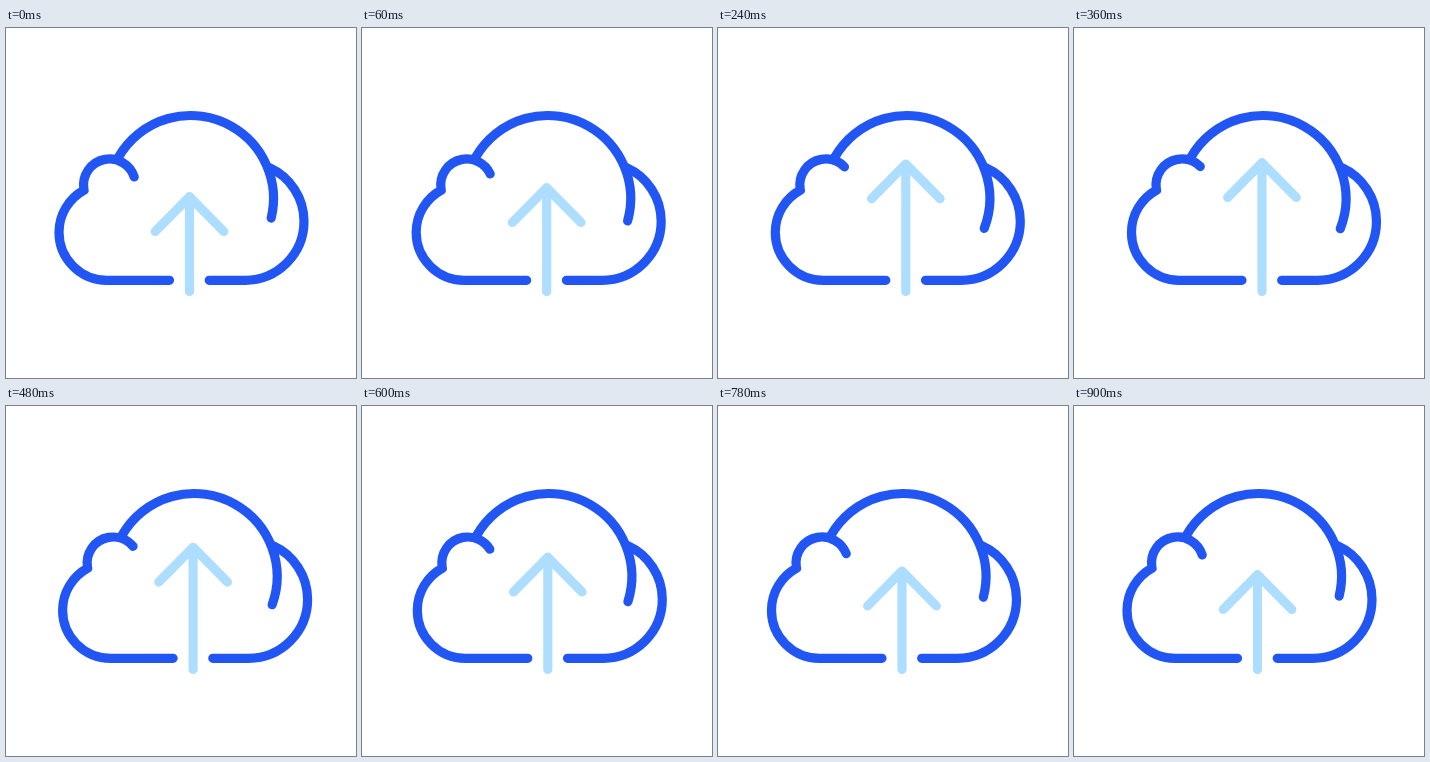
Recreate the animation shown at these times as an HTML page with a canvas. Size 350x350 px, loop 1040 ms.

```html
<!DOCTYPE html>
<html lang="en">
<head>
<meta charset="utf-8">
<title>Cloud upload</title>
<style>
  html, body { margin: 0; height: 100%; overflow: hidden; background: #fff; }
  canvas { display: block; }
</style>
</head>
<body>
<canvas id="stage" width="350" height="350"></canvas>
<script>
const ctx = document.getElementById('stage').getContext('2d');
const LOOP = 1040, STEP = 30, PEAK = 10, LAST = 30;
const rad = deg => deg * Math.PI / 180;

// 0 at rest, 1 when raised: quick rise, slow smooth return
function lift(ms) {
  const n = Math.min(Math.floor(ms / STEP), LAST);
  if (n < PEAK) {
    const p = n / PEAK;
    return p * (1.2 + 0.6 * p - 0.8 * p * p);
  }
  const p = (n - PEAK) / (LAST - PEAK);
  return 1 - p * p * (3 - 2 * p);
}

function stroke(color, build) {
  ctx.strokeStyle = color;
  ctx.beginPath();
  build();
  ctx.stroke();
}

function drawCloud(k) {
  stroke('#2156f5', () => {
    // left side and small bump
    ctx.moveTo(163.5, 252.3);
    ctx.arc(101, 204.3, 48, rad(90), rad(241.5));
    ctx.arc(103.5, 157, 26, rad(170), rad(342 - 28 * k));
    // main dome
    ctx.moveTo(184.5 + 83 * Math.cos(rad(209.5)), 170.5 + 83 * Math.sin(rad(209.5)));
    ctx.arc(184.5, 170.5, 83, rad(209.5), rad(373.6 + 8 * k));
    // right side
    ctx.moveTo(203.2, 252.3);
    ctx.arc(239, 193.3, 59, rad(90), rad(-66), true);
  });
}

function drawArrow(k) {
  const x = 183.5, y = 168.7 - 35 * k, wing = 34.3;
  stroke('#aedeff', () => {
    ctx.moveTo(x, 263.5);
    ctx.lineTo(x, y);
    ctx.moveTo(x - wing, y + wing + 0.5);
    ctx.lineTo(x, y);
    ctx.lineTo(x + wing, y + wing + 0.5);
  });
}

function draw(now) {
  const k = lift(now % LOOP);
  ctx.setTransform(1, 0, 0, 1, 0, 0);
  ctx.fillStyle = '#fff';
  ctx.fillRect(0, 0, 350, 350);
  ctx.translate(4.6 * k, 0);
  ctx.lineWidth = 9.2;
  ctx.lineCap = ctx.lineJoin = 'round';
  drawCloud(k);
  drawArrow(k);
}

const start = performance.now();
function tick() {
  draw(performance.now() - start);
  requestAnimationFrame(tick);
}
tick();
</script>
</body>
</html>
```
